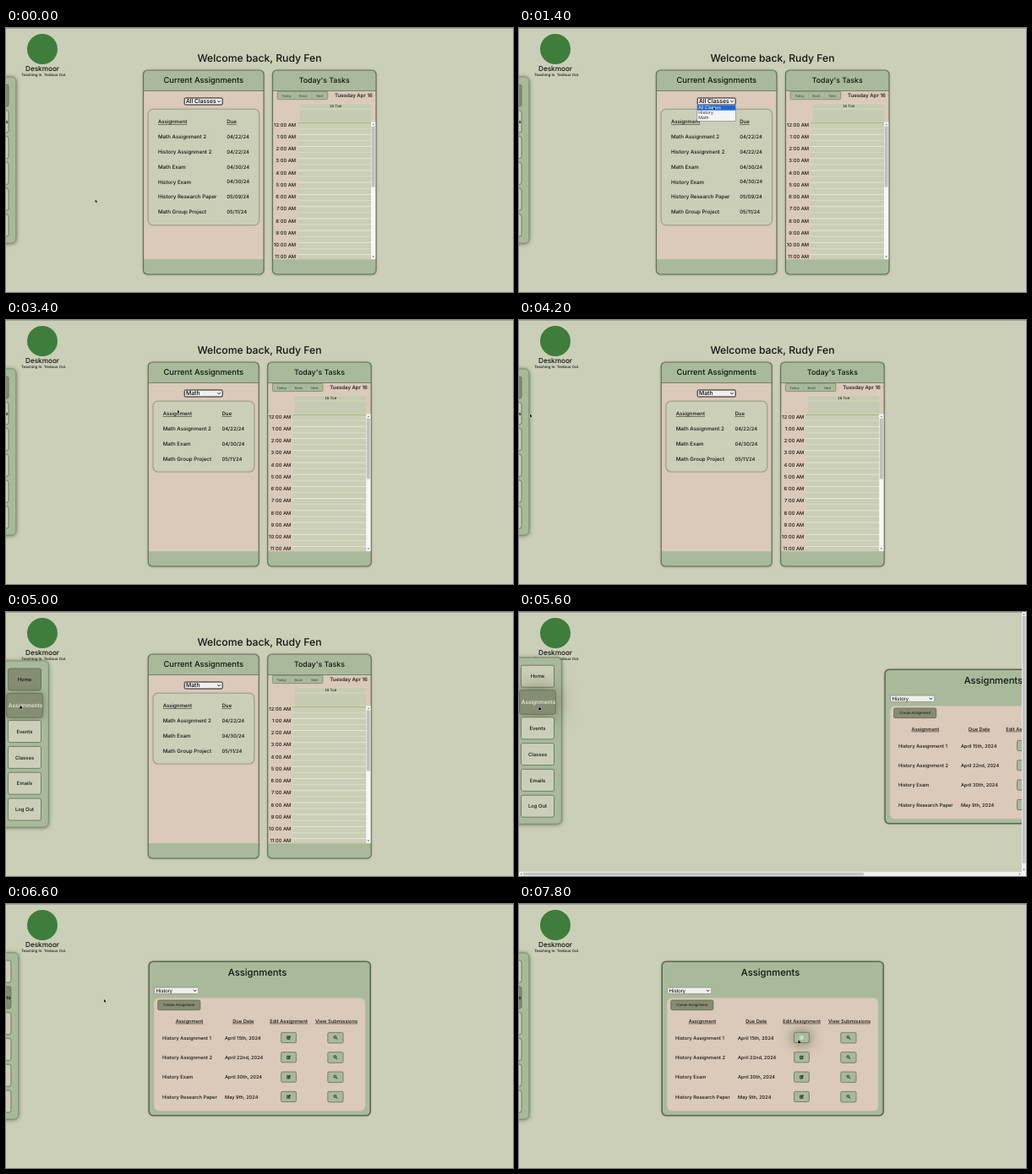
Animation of 600x313 px, one loop 8000 ms. Source, as an HTML page with a canvas:

```html
<!DOCTYPE html>
<html lang="en">
<head>
<meta charset="utf-8">
<title>School planner</title>
<style>
html, body { margin: 0; width: 100%; height: 100%; overflow: hidden; background: #cbcfb8; }
canvas { display: block; width: 600px; height: 313px; }
</style>
</head>
<body>
<canvas id="stage"></canvas>
<script>
const W = 600, H = 313, LOOP = 8000, STEP = 200;
const SANS = 'Inter, sans-serif';
const ARIAL = '"Liberation Sans", Arial, sans-serif';
const C = {
  page: '#cbcfb8', green: '#a8ba9a', pink: '#dbc9ba', dark: '#858d72',
  edge: '#64725b', soft: '#98a38a', ink: '#11140f', pale: '#eef0e2'
};
const canvas = document.getElementById('stage');
const ctx = canvas.getContext('2d');
const dpr = window.devicePixelRatio || 1;
canvas.width = W * dpr;
canvas.height = H * dpr;
ctx.textRendering = 'geometricPrecision'; // fractional glyph spacing at small sizes

const clamp = v => Math.max(0, Math.min(1, v));
const smooth = v => { v = clamp(v); return v * v * (3 - 2 * v); };
const ramp = (t, from, to) => smooth((t - from) / (to - from));

// Cursor stops: time, x, y
const PATH = [
  [0, 105.6, 203.4], [200, 105.6, 203.4], [1000, 232, 87], [1200, 232, 87], [1600, 228, 100],
  [2000, 228, 100], [2400, 229, 86.5], [2600, 229, 86.5], [3000, 225, 106], [3200, 225, 106],
  [4200, 13, 111.5], [4800, 17, 110.5], [5200, 17, 110.5], [5600, 24, 112], [6000, 45.6, 109],
  [6200, 62, 109], [7200, 215, 120], [7600, 331, 161], [8000, 331, 161]
];

function cursorAt(t) {
  const i = Math.max(1, PATH.findIndex(k => k[0] > t));
  const [t0, x0, y0] = PATH[i - 1], [t1, x1, y1] = PATH[i];
  const p = ramp(t, t0, t1);
  return { x: x0 + (x1 - x0) * p, y: y0 + (y1 - y0) * p };
}

function rect(x, y, w, h, fill) {
  ctx.fillStyle = fill;
  ctx.fillRect(x, y, w, h);
}

function box(x, y, w, h, r, fill, stroke, line = 1, glow) {
  ctx.save();
  ctx.beginPath();
  ctx.roundRect(x, y, w, h, r);
  if (glow) {
    ctx.shadowColor = glow.color;
    ctx.shadowBlur = glow.blur * dpr;
    ctx.shadowOffsetY = (glow.dy || 0) * dpr;
  }
  ctx.fillStyle = fill;
  ctx.fill();
  ctx.shadowColor = 'transparent';
  if (stroke) {
    ctx.strokeStyle = stroke;
    ctx.lineWidth = line;
    ctx.stroke();
  }
  ctx.restore();
}

function text(s, x, y, size, o = {}) {
  ctx.font = `${o.weight || 500} ${size}px ${o.font || SANS}`;
  ctx.textAlign = o.align || 'left';
  ctx.textBaseline = 'alphabetic';
  ctx.fillStyle = o.color || C.ink;
  const base = y + size * 0.36;
  ctx.fillText(s, x, base);
  if (o.under) {
    const w = ctx.measureText(s).width;
    const left = o.align === 'center' ? x - w / 2 : x;
    rect(left, base + 0.8, w, 0.5, C.ink);
  }
}

const mid = (s, x, y, size, o) => text(s, x, y, size, { align: 'center', ...o });

function stroke(points, color, width) {
  ctx.beginPath();
  points.forEach(([x, y]) => ctx.lineTo(x, y));
  ctx.strokeStyle = color;
  ctx.lineWidth = width;
  ctx.stroke();
}

function triangle(x, y, r, angle) {
  ctx.save();
  ctx.translate(x, y);
  ctx.rotate(angle);
  ctx.beginPath();
  ctx.moveTo(-r, r * 0.5);
  ctx.lineTo(0, -r * 0.6);
  ctx.lineTo(r, r * 0.5);
  ctx.fillStyle = '#555';
  ctx.fill();
  ctx.restore();
}

function select(x, y, w, h, label, size, font, focused) {
  box(x, y, w, h, 1.2, '#efefed', focused ? '#181818' : '#767676', focused ? 1 : 0.6);
  text(label, x + 1.8, y + h / 2, size, { font, weight: font ? 400 : 500, color: '#000' });
  const ax = x + w - 4.2, ay = y + h / 2;
  stroke([[ax - 1.7, ay - 0.9], [ax, ay + 0.9], [ax + 1.7, ay - 0.9]], '#111', 0.9);
}

function drawBrand() {
  ctx.beginPath();
  ctx.arc(43, 25, 18, 0, Math.PI * 2);
  ctx.fillStyle = '#3f7d3c';
  ctx.fill();
  mid('Deskmoor', 43, 48, 8.2);
  mid('Teaching In. Tedious Out.', 44.7, 55.8, 4.4);
}

function panel(x, w, title, size) {
  box(x, 50, w, 242, 5, C.pink, null, 0, { color: 'rgba(40,50,35,.45)', blur: 3, dy: 0.5 });
  box(x, 50, w, 24.5, [5, 5, 0, 0], C.green);
  box(x, 274.3, w, 17.7, [0, 0, 5, 5], C.green);
  rect(x, 74, w, 0.8, C.edge);
  box(x, 50, w, 242, 5, 'transparent', C.edge, 1.2);
  mid(title, x + w / 2, 61.7, size);
}

const WORK = [
  ['Math Assignment 2', '04/22/24'], ['History Assignment 2', '04/22/24'],
  ['Math Exam', '04/30/24'], ['History Exam', '04/30/24'],
  ['History Research Paper', '05/09/24'], ['Math Group Project', '05/11/24']
];

function drawWork(course, inset) {
  const x = 162.5 + inset, w = 142.5 - 2 * inset;
  const rows = WORK.filter(r => course === 'All Classes' || r[0].startsWith(course));
  panel(x, w, 'Current Assignments', 9.4);
  select(211.2, 83, 45, 8, course, 6.8, null, true);
  box(x + 5.7, 96.3, w - 11.2, 30 + rows.length * 17.9, 6, C.page, C.soft, 1.1,
    { color: 'rgba(60,70,50,.35)', blur: 2 });
  const nameX = x + 17.4, dueX = x + w - 43.8;
  text('Assignment', nameX, 111, 6.05, { under: true });
  text('Due', dueX, 111, 6.05, { under: true });
  rows.forEach(([name, due], i) => {
    const y = 128.8 + i * 17.85;
    text(name, nameX, y, 6.2);
    text(due, dueX, y, 5.9);
  });
}

function drawMenu(active) {
  rect(210.6, 91.3, 46, 19.2, '#777');
  rect(211.1, 91.6, 45, 18.4, '#f4f4f2');
  ['All Classes', 'History', 'Math'].forEach((name, i) => {
    const y = 94.5 + i * 6.05;
    if (i === active) rect(211.1, y - 3, 45, 6.1, '#1a66d0');
    text(name, 212.3, y, 5.2, { weight: 400, color: i === active ? '#fff' : '#333' });
  });
}

function drawTasks(inset) {
  ctx.save();
  ctx.translate(-inset, 0);
  panel(315.5, 122.5, "Today's Tasks", 8.8);
  ctx.beginPath();
  ctx.rect(316, 74.8, 121.6, 199.5);
  ctx.clip();
  box(321.2, 75.2, 59.5, 9.4, 1.2, C.green, C.edge, 0.6);
  rect(342, 75.4, 0.4, 9, C.soft);
  rect(361.2, 75.4, 0.4, 9, C.soft);
  [['Today', 332], ['Back', 352], ['Next', 371]].forEach(([s, x]) =>
    mid(s, x, 80, 4.2, { font: ARIAL, weight: 400, color: '#3c463a' }));
  text('Tuesday Apr 16', 389, 79.6, 6.1);
  text('–', 436.6, 79.6, 6.1, { color: C.edge });

  rect(347.5, 89.8, 84.5, 22, '#c5cbb0');
  rect(347.5, 89.6, 90, 0.5, '#d9d6c4');
  rect(347.5, 95.8, 84.5, 0.5, '#dfe2d0');
  mid('16 Tue', 390, 92.8, 4.6, { font: ARIAL, weight: 400 });
  rect(316, 111, 121.6, 0.9, '#d5d2c2');

  rect(345, 111.8, 87.2, 163, '#c9ceb5');
  rect(344.6, 111.8, 0.5, 163, '#d6d6c4');
  for (let h = 0; h < 12; h++) {
    const y = 112 + h * 14.23;
    if (h) rect(345, y - 0.4, 87.2, 0.9, '#e7e9da');
    rect(345, y + 6.8, 87.2, 0.7, '#dee1cf');
    text(`${h || 12}:00 AM`, 343, y + 2.7, 5.75, { align: 'right' });
  }
  rect(345, 112, 87.2, 0.8, '#98b66a');

  rect(432, 111.5, 5.4, 163, '#f7f7f6');
  rect(432.6, 116.5, 4, 72, '#bfc1be');
  triangle(434.7, 114.2, 1.3, 0);
  triangle(434.7, 271.2, 1.3, Math.PI);
  ctx.restore();
}

function drawPen(x, y, color) {
  stroke([[x + 0.3, y - 1.4], [x - 1.8, y - 1.4], [x - 1.8, y + 1.9], [x + 1.4, y + 1.9], [x + 1.4, y + 0.4]], color, 0.8);
  stroke([[x - 0.5, y + 0.7], [x + 2, y - 1.8]], color, 1.3);
}

function drawLens(x, y) {
  ctx.beginPath();
  ctx.arc(x - 0.5, y - 0.5, 1.4, 0, Math.PI * 2);
  ctx.strokeStyle = C.ink;
  ctx.lineWidth = 0.8;
  ctx.stroke();
  stroke([[x + 0.6, y + 0.6], [x + 2.2, y + 2.2]], C.ink, 1);
}

const COURSE_ROWS = [
  ['History Assignment 1', 'April 15th, 2024'], ['History Assignment 2', 'April 22nd, 2024'],
  ['History Exam', 'April 30th, 2024'], ['History Research Paper', 'May 9th, 2024']
];

function drawAssignments(dx, glow) {
  ctx.save();
  ctx.translate(dx, 0);
  box(169.2, 68.2, 262, 182.6, 5, C.green, '#5d6953', 1.6, { color: 'rgba(40,50,35,.4)', blur: 3 });
  mid('Assignments', 297.5, 81, 11.2);
  select(175.8, 99, 52, 7.4, 'History', 6.2, ARIAL, false);
  box(175, 111.2, 250.3, 134.2, 6, C.pink, '#b9b7a2', 0.5);
  box(179.8, 114, 50, 11.6, 1.5, C.dark, '#59634f', 0.8);
  mid('Create Assignment', 204.8, 119.8, 4.4, { font: ARIAL, weight: 400 });
  [['Assignment', 217], ['Due Date', 280.8], ['Edit Assignment', 334.6], ['View Submissions', 391]]
    .forEach(([s, x]) => mid(s, x, 138.8, 5.75, { under: true }));
  COURSE_ROWS.forEach(([name, due], i) => {
    const y = 158.5 + i * 23.35, hot = i === 0 && glow > 0;
    text(name, 185, y, 5.75);
    text(due, 259, y, 5.65);
    box(325.6, y - 6.2, 17.8, 12.2, 1.5, C.green, C.edge, 0.8,
      hot && { color: `rgba(75,90,55,${glow})`, blur: 16 });
    drawPen(334.5, y - 0.2, hot ? C.pale : C.ink);
    box(380.8, y - 6.2, 18.2, 12.6, 1.5, C.green, C.edge, 0.8);
    drawLens(389.9, y - 0.2);
  });
  ctx.restore();
}

function drawNav(open, active, hover, lift) {
  ctx.save();
  ctx.translate(-38.5 * (1 - open), -lift);
  box(-12, 58, 62.3, 197, 5, C.green, '#76856b', 0.7, { color: 'rgba(35,45,30,.7)', blur: 5, dy: 0.5 });
  ['Home', 'Assignments', 'Events', 'Classes', 'Emails', 'Log Out'].forEach((name, i) => {
    const y = 80 + i * 30.8, hot = i === 1 ? hover : 0;
    const w = 39 + 3.6 * hot, h = 26 + 2.6 * hot;
    box(22 - w / 2, y - h / 2, w, h, 2.2, i === active || hot ? C.dark : C.page, '#5f6c55', 0.8,
      hot && { color: `rgba(95,90,60,${0.75 * hot})`, blur: lift ? 24 : 8 });
    mid(name, i === 1 ? 23 : 22, y, 5.9 + 0.6 * hot, { color: hot ? C.pale : C.ink });
  });
  ctx.restore();
}

function drawScrollbars(dx) {
  const span = 585 * 595 / (W + dx);
  rect(595, 0, 5, H, '#f1f1f0');
  rect(0, 308.2, W, 5, '#f1f1f0');
  rect(595.8, 5, 3.6, 293, '#c1c1c1');
  rect(5, 309, span, 3.4, '#c1c1c1');
  triangle(597.5, 2.6, 1.3, 0);
  triangle(597.5, 305.5, 1.3, Math.PI);
  triangle(2.6, 310.7, 1.3, -Math.PI / 2);
  triangle(592.5, 310.7, 1.3, Math.PI / 2);
}

const ARROW = [[0, 0], [0, 3.7], [0.9, 2.9], [1.6, 4.3], [2.2, 4], [1.6, 2.7], [2.7, 2.6]];
const HAND = [[-0.5, 0], [0.3, 0], [0.4, 1.3], [2.3, 1.7], [2.3, 3.3], [1.7, 4.3], [-0.5, 4.3], [-1.6, 2.6], [-0.5, 2.6]];

function drawCursor({ x, y }, hand) {
  ctx.save();
  ctx.translate(x, y);
  ctx.beginPath();
  (hand ? HAND : ARROW).forEach(([px, py]) => ctx.lineTo(px, py));
  ctx.closePath();
  ctx.strokeStyle = 'rgba(255,255,255,.75)';
  ctx.lineWidth = 0.9;
  ctx.stroke();
  ctx.fillStyle = '#0a0a0a';
  ctx.fill();
  ctx.restore();
}

function menuItem(t) {
  if (t >= 1200 && t < 1800) return t < 1600 ? 0 : 1;
  if (t >= 2600 && t < 3200) return t < 3000 ? 1 : 2;
  return -1;
}

function draw(t) {
  ctx.setTransform(dpr, 0, 0, dpr, 0, 0);
  rect(0, 0, W, H, C.page);
  rect(0, 0, W, 0.8, '#8d9c82');
  drawBrand();

  const onHome = t < 5400;
  const dx = onHome ? 0 : 600 * Math.pow(1 - clamp((t - 5400) / 400), 1.185);
  const editGlow = t >= 7600 ? ramp(t, 7400, 7800) : 0;
  const hover = t >= 4600 && t < 6000 ? ramp(t, 4400, 4900) : 0;
  const open = ramp(t, 4200, 4800) * (1 - ramp(t, 6100, 6700));

  if (onHome) {
    const course = t < 1800 ? 'All Classes' : t < 3200 ? 'History' : 'Math';
    const inset = course === 'Math' ? 5.8 : 0;
    const item = menuItem(t);
    mid('Welcome back, Rudy Fen', 300, 35.3, 12.2);
    drawWork(course, inset);
    drawTasks(inset);
    if (item >= 0) drawMenu(item);
  } else {
    drawAssignments(dx, editGlow);
  }
  drawNav(open, onHome ? 0 : 1, hover, dx > 0 ? 3.8 : 0);
  if (dx > 0) drawScrollbars(dx);
  drawCursor(cursorAt(t), hover > 0 || editGlow > 0);
}

const start = performance.now();
function tick() {
  const t = (performance.now() - start) % LOOP;
  draw(Math.floor(t / STEP) * STEP);
  requestAnimationFrame(tick);
}
tick();
</script>
</body>
</html>
```
